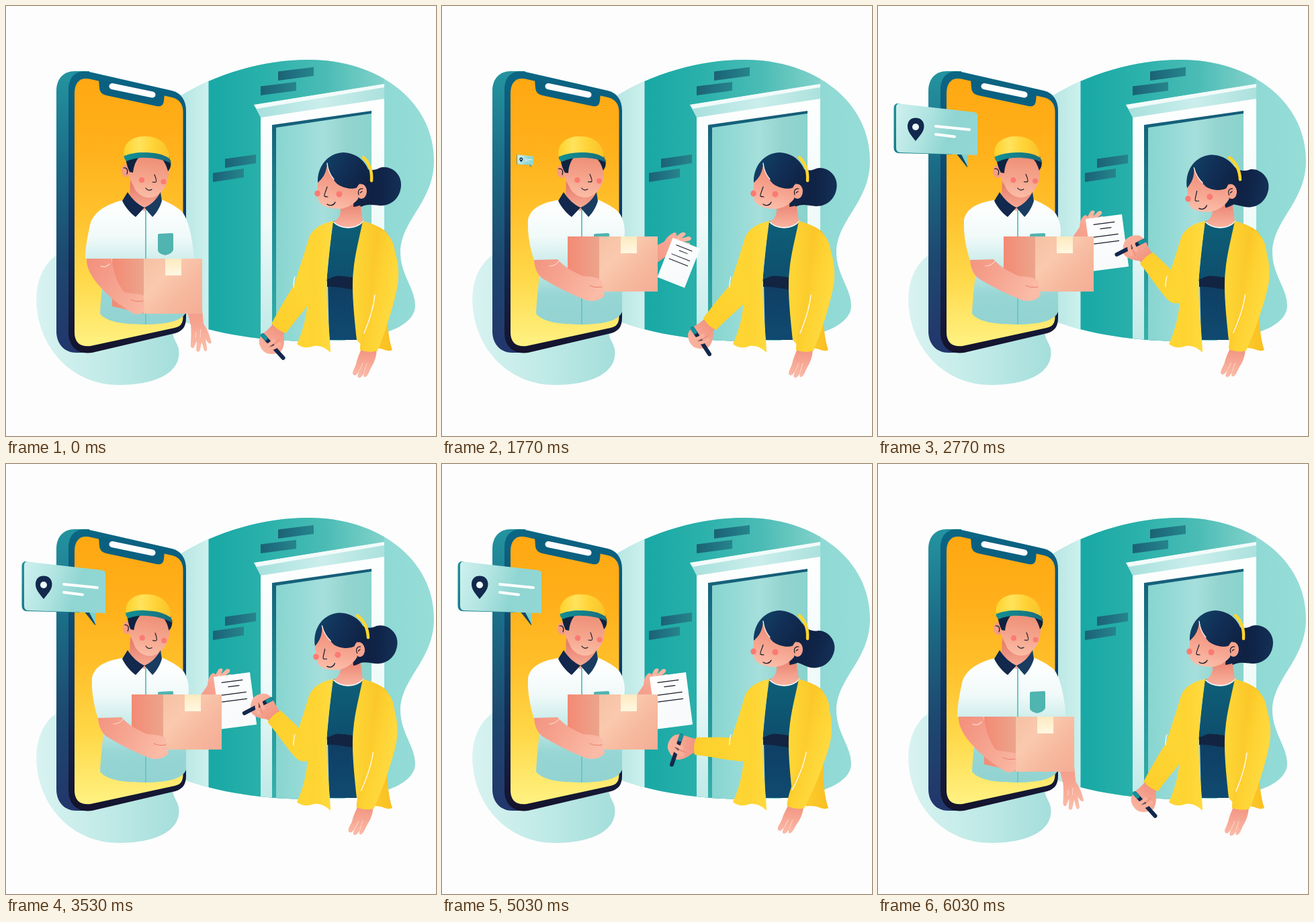
Animation, 640 px wide and 640 px high, one loop 6060 ms. Source, as an HTML page with a canvas:

```html
<!DOCTYPE html>
<html lang="en">
<head>
<meta charset="utf-8">
<title>Parcel delivery</title>
<style>
  html, body { margin: 0; width: 100%; height: 100%; overflow: hidden; background: #fdfdfd; }
  canvas { display: block; width: 640px; height: 640px; }
</style>
</head>
<body>
<canvas id="stage"></canvas>
<script>
const LOOP = 6060, RAD = Math.PI / 180;
const cv = document.getElementById('stage');
const c = cv.getContext('2d');
const dpr = window.devicePixelRatio || 1;
cv.width = cv.height = 640 * dpr;

const NAVY = '#12284c', INK = '#1a1a2a', BLUSH = '#fb7a72';

// ---- helpers ----
const ease = p => (1 - Math.cos(Math.PI * p)) / 2;

function key(t, ...k) {
  if (t <= k[0][0]) return k[0][1];
  for (let i = 1; i < k.length; i++) {
    const [a, va] = k[i - 1], [b, vb] = k[i];
    if (t < b) return va + (vb - va) * ease((t - a) / (b - a));
  }
  return k[k.length - 1][1];
}

// blends two path strings with the same commands
function mix([a, b], u) {
  const nums = b.match(/-?[\d.]+/g);
  let i = 0;
  return new Path2D(a.replace(/-?[\d.]+/g, n => {
    const m = nums[i++];
    return (+n + (m - n) * u).toFixed(2);
  }));
}

function grad(x0, y0, x1, y1, ...cols) {
  const g = c.createLinearGradient(x0, y0, x1, y1);
  cols.forEach((col, i) => g.addColorStop(i / (cols.length - 1), col));
  return g;
}

const cache = {};
const path = d => d instanceof Path2D ? d : cache[d] || (cache[d] = new Path2D(d));

function fill(d, style) {
  c.fillStyle = style;
  c.fill(path(d));
}

function line(d, style, w) {
  c.strokeStyle = style;
  c.lineWidth = w;
  c.stroke(path(d));
}

function oval(x, y, rx, ry, style) {
  c.fillStyle = style;
  c.beginPath();
  c.ellipse(x, y, rx, ry, 0, 0, 7);
  c.fill();
}

function turn(x, y, deg, draw) {
  c.save();
  c.translate(x, y);
  c.rotate(deg * RAD);
  c.translate(-x, -y);
  draw();
  c.restore();
}

// ---- scenery ----
const BLOB = 'M255,137 C312,100 385,80 450,80 C555,80 637,142 637,230 C637,292 588,318 587,366 ' +
  'C587,400 609,420 609,446 C609,480 545,498 480,498 C410,501 325,494 255,466 Z';

function scenery() {
  fill('M80,368 C54,382 42,415 46,450 C52,512 100,564 168,564 C222,564 262,546 257,511 C255,499 245,494 250,478 L100,400 Z',
    grad(46, 0, 258, 0, '#d8f3f1', '#c0eae7', '#a4dedb'));
  c.save();
  c.clip(path(BLOB));
  c.fillStyle = grad(560, 0, 640, 0, '#8fd9d4', '#97ddd8');
  c.fillRect(240, 70, 400, 440);
  c.fillStyle = grad(255, 0, 301, 0, '#b4e5e2', '#cdf0ed');
  c.fillRect(250, 70, 52, 440);
  c.fillStyle = grad(301, 0, 563, 0, '#18a8a5', '#2bb1ab', '#4bbcb5', '#82d2cb');
  c.fillRect(301.5, 70, 261.5, 440);

  // door
  fill('M379,164 L563,136 L563,500 L379,500 Z', grad(0, 150, 0, 498, '#fdfefe', '#effaf9', '#bfe9e7'));
  fill('M369,147 L563,116 L563,138 L379,166 Z', grad(379, 0, 563, 0, '#aae1de', '#cbeeec', '#ace1dd'));
  fill('M369,147 L563,116 L563,121 L373,153 Z', '#f2fbfa');
  fill('M396,177 L544,156 L544,500 L396,500 Z', grad(0, 160, 0, 490, '#155d78', '#1f8c94', '#34b0aa'));
  fill('M402,181 L544,160 L544,500 L402,500 Z', grad(402, 0, 544, 0, '#88d5d0', '#95dad6', '#a6dfdc', '#93d4cf', '#8ad3cd'));
  c.restore();

  const brick = (x, y, w) =>
    fill(`M${x},${y} l${w},-6.5 l0,13 l${-w},7 Z`, grad(x, 0, x + w, 0, '#1b6274', '#207383', '#26858a'));
  brick(405, 97.5, 53);
  brick(379, 119.5, 53);
  brick(326, 227.5, 46);
  brick(308, 248.5, 46);
}

function phone() {
  fill('M75,126 C75,108 86,97 102,97 L124,97 L124,516 L104,516 C88,516 75,504 75,484 Z',
    grad(0, 97, 0, 516, '#2494a0', '#1b6c86', '#1d486f', '#22366c'));
  fill('M93,124 C93,104 106,94 124,98 L247,126 C260,129 268,140 268,156 L268,464 C268,478 262,484 252,487 ' +
    'L128,516 C108,519 93,508 93,486 Z',
    grad(0, 97, 0, 516, '#0b6784', '#0d5278', '#123a64', '#13234a', '#15132c'));
  fill('M102,130 C102,113 111,106 124,108.500 L247,136 C258,139 263.500,146 263.500,158 L263.500,462 ' +
    'C263.500,472 260,477 251,479 L126,506 C111,508 102,501 102,486 Z',
    grad(0, 108, 0, 506, '#ffa812', '#ffb01a', '#ffc12c', '#ffd94a', '#fff282'));
  fill('M138,109 L139,122 C140,129 143,131 149,133 L224,149 C231,150 234,148 235,141 L236,130 Z', '#0b6080');
  line('M158,119.500 L218,132', '#fdfdfd', 9);
}

function bubble(s) {
  if (s <= 0.01) return;
  c.save();
  c.translate(133, 240);
  c.scale(s, s);
  c.translate(-133, -240);
  fill('M28,145 C25,146 23.500,148 23.500,152 L23.500,210 C23.500,215 25,218 30,219 L110,221 L60,150 Z',
    grad(0, 146, 0, 219, '#23919a', '#167c8c'));
  fill('M116,219 L133,240.500 L131,220 Z', '#124a68');
  fill('M123,219 L134,240 L133,219 Z', '#7fcfca');
  fill('M32,145.500 L143,158 Q148,159 148,163 L148,222 L33,218 Q27,217.500 27,211 L27,151 Q27,145 32,145.500 Z',
    grad(27, 160, 148, 200, '#ccefed', '#b2e5e2', '#8fd5d1', '#92d7d3'));
  fill('M56,201 C51,194 44,188 44,179 C44,171 49,166.500 56,166.500 C63,166.500 68.500,171 68.500,179 C68.500,188 61,194 56,201 Z', NAVY);
  oval(56, 180, 5, 5, '#f0fbfa');
  line('M86,179 L136,184', '#fff', 4);
  line('M86,191 L114,194.500', '#fff', 4);
  c.restore();
}

// ---- courier ----
function paper(s) {
  if (s <= 0.01) return;
  c.save();
  c.translate(88.8, -7);
  c.rotate(53.6 * RAD);
  c.scale(s, s);
  fill('M0,0 L54.500,0 L54.500,78.500 L0,78.500 Z', grad(0, 0, 54, 78, '#fefefe', '#f7f9fa'));
  line('M11,10 L42,10 M20,17.500 L36,17.500 M9,28.500 L45,28.500 M8,38.500 L45,38.500', INK, 1.3);
  c.restore();
}

// open hand, holding hand
const REACH = [
  'M0,-14 C30,-12 55,-11 78,-9 C88,-14 96,-15 107,-16 C110,-14 108,-11 100,-8 L116,-8 C120,-6 119,-3 115,-3 ' +
  'L104,-2 L116,3 C119,6 117,9 113,8 L101,5 L110,11 C112,14 109,16 105,15 C96,13 88,11 77,10 C50,12 25,14 0,13 Z',
  'M0,-14 C30,-12 55,-11 74,-9 C80,-12 86,-13 90,-12 C94,-11 95,-9 93,-6 L101,-6 C106,-5 107,-1 104,0 ' +
  'L98,1 L108,4 C112,7 110,11 106,10 L98,7 L104,12 C106,15 103,17 99,16 C92,14 84,12 77,10 C50,12 25,14 0,13 Z'];

function courierReach(raise, sheet) {
  c.save();
  c.translate(272, 398);
  c.rotate((80.3 - 141.3 * raise) * RAD);
  fill(mix(REACH, raise), grad(30, 0, 118, 0, '#f39482', '#f6a390', '#fbbfaa'));
  line('M86,-3 L96,-1 M88,4 L95,6', '#fdd9cc', 1);
  paper(sheet);
  c.restore();
}

const SHIRT = [
  'M178,288 C150,294 130,306 125,326 C121,345 118,360 118,376 L146,378 C145,405 141,435 140,458 C150,471 178,474 208,474 ' +
  'C240,474 264,468 268,455 L270,376 L280,376 C278,350 272,318 262,306 C252,297 240,292 230,287 L206,304 Z',
  'M178,288 C150,292 132,300 128,318 C127,340 131,360 137,379 L146,382 C145,405 141,435 140,458 C150,471 178,474 208,474 ' +
  'C240,474 264,468 268,455 L268,376 L271,345 C274,332 270,314 262,306 C252,297 240,292 230,287 L206,304 Z'];
const ARM = [
  'M120,376 C119,390 128,405 142,420 C158,438 175,448 188,457 C196,461 205,458 206,451 L205,431 C196,427 182,429 175,425 C165,412 160,395 157,376 Z',
  'M137,378 C138,392 143,402 152,407 C170,418 190,428 212,437 C222,441 237,439 242,430 L238,409 C230,402 218,403 210,402 C195,396 182,388 172,377 Z'];
const CREASE = ['M141,387 C145,389 150,388 154,384', 'M160,387 C165,387 170,385 174,380'];
const FINGER = ['M186,437 C192,440 198,440 204,439', 'M220,416 C226,419 232,419 238,418'];

function courierHead() {
  oval(179, 245, 7, 9.5, '#f59c84');
  fill('M183,228 C200,222 232,225 242,232 C244,258 239,274 223,283 C213,288 200,285 192,273 L183,254 Z',
    grad(215, 224, 208, 286, '#ee8f76', '#f5a48c', '#fbbda6'));
  line('M175,241 C180,240 182,244 180,250', INK, 1.2);
  oval(202, 259, 4.2, 4.2, BLUSH);
  oval(234.500, 261.500, 4, 4, BLUSH);
  line('M221,251 C223,256 225,261 223,262 C221,263 220,262 218,262', INK, 1.2);
  line('M208,271 C210,274.500 214,275 217,273', INK, 1.2);
  // sideburns
  fill('M178,226 L198,225 C193,231 190,238 189,248 L184,247 C181,241 179,234 178,226 Z', '#10223f');
  fill('M230,226 L245,230 C246,237 245,242 241,246 C239,238 236,231 230,226 Z', '#10223f');
  fill('M176,222 C190,212 226,210 243,224 L245,234 C234,228 215,225 200,226 C190,227 184,229 180,231 C177,229 175,226 176,222 Z',
    grad(176, 0, 243, 0, '#128f94', '#14808a', '#1c6c7c'));
  fill('M176,223 C173,206 186,194 206,194 C230,194 243,207 243,227 C233,220 222,218 204,218 C193,218 184,220 176,223 Z',
    grad(176, 0, 243, 0, '#ffd22c', '#ffe35c', '#ffd235', '#f8c22c'));
}

function courier(u, raise, sheet, tilt) {
  courierReach(raise, sheet);
  fill(mix(SHIRT, u), grad(0, 300, 0, 474, '#fdfefe', '#f0faf9', '#c6eae8', '#96d6d4', '#92d3d2'));
  line('M208,302 L208,473', '#6cc6c2', 2);
  fill('M226,341 Q226,339 228,339 L247,338 Q249,338 249,340 L249,363 Q248,368 237,371 Q227,369 226,364 Z', '#50b4b0');
  fill('M185,258 L184,281 C190,297 200,304 206,305 C215,301 226,292 229,281 L226,268 Z', grad(0, 268, 0, 304, '#e87f6e', '#f9b09c'));
  turn(207, 275, tilt, courierHead);
  fill('M173,290 L181,277 C188,288 197,296 206,300 L193,314 C185,308 178,300 173,290 Z', NAVY);
  fill('M230,277 L232,290 C229,300 224,308 218,314 L206,300 C216,296 224,288 230,277 Z', '#193c60');

  c.save();
  c.translate(29 * u, -33 * u);
  fill('M158,376 L205.500,376 L205.500,458 L158,447 Z', grad(158, 0, 205, 0, '#f38a74', '#f19780', '#eba58c'));
  fill('M205,376 L292,376 L292,458 L205,458 Z', grad(205, 376, 292, 458, '#f6c1a4', '#fac9ae', '#f6b89e', '#f5ad96'));
  fill('M237,376 L261,376 L261,401 L237,401 Z', grad(0, 376, 0, 401, '#fdeac0', '#fff8e2'));
  c.restore();

  fill(mix(ARM, u), grad(125, 380, 225, 435, '#f2917e', '#f6a591', '#fabba7'));
  line(mix(CREASE, u), '#fddccf', 1.2);
  line(mix(FINGER, u), '#ea7d6c', 1);
}

// ---- customer ----
function customerHead(sway) {
  turn(536, 258, sway, () =>
    fill('M530,238 C540,246 549,245 556,241 C570,236 589,248 588,267 C587,287 572,298 556,297 C545,296 538,294 528,299 C520,280 522,255 530,238 Z',
      grad(530, 0, 588, 0, '#0e2040', '#102448', '#143056')));
  fill('M520,235 C544,236 548,262 541,288 C535,294 526,298 517,299 Z', '#102346');
  fill('M470,240 C464,255 462,275 465,290 C470,299 484,302 496,302 C508,301 518,295 524,287 L530,250 L500,228 Z',
    grad(495, 245, 480, 302, '#f08f7a', '#f6a590', '#fcc0ac'));
  fill('M464,263 C463,238 480,218 503,218 C526,219 544,238 542,263 L535,268 C530,262 525,263 523,270 C516,274 500,271 492,264 ' +
    'C485,256 480,246 478,234 C477,248 472,256 464,263 Z', grad(464, 220, 540, 270, '#10466a', '#122f56', '#0f2040'));
  line('M478,234 C479,244 483,252 488,258', '#fdf4f0', 1.3);
  line('M532,225.500 C541,234 545,246 544,260', '#ffd62e', 4.5);
  oval(529, 276, 8, 11, '#f7a48e');
  line('M525,281 C523,275 526,271 531,272 M527,278 L530,276', INK, 1.2);
  oval(463.500, 279, 4.2, 4.5, BLUSH);
  oval(496, 280, 4.5, 4.5, BLUSH);
  line('M478,269 C476,276 473,281 474,283 C475,284 477,284 479,284', INK, 1.2);
  line('M478,295 C482,298 488,297 490,292', INK, 1.3);
}

function penArm(angle) {
  c.save();
  c.translate(443, 425);
  c.rotate(angle * RAD);
  fill('M60,-10 L70,-11 C76,-17 84,-22 92,-22 C99,-20 105,-12 107,-6 C108,2 104,10 98,14 C92,17 84,15 78,13 L68,11 L60,11 Z',
    grad(62, 0, 106, 0, '#f0917e', '#fab4a0'));
  line('M88,14 L99,-30', NAVY, 6);
  line('M88,14 L89.500,8', '#16909a', 6);
  line('M85,-14 C92,-12 97,-8 101,-4 M86,-4 C92,-3 96,-1 99,2', '#f9b09b', 5.5);
  line('M80,-10 C86,-8 91,-8 97,-4', '#e67c6a', 0.8);
  fill('M2,-17 C24,-17 46,-13 66,-13 Q70,0 66,13 C44,15 24,17 2,17 A17,17 0 0 1 2,-17 Z',
    grad(-10, 0, 68, 0, '#fed634', '#fdcf2c'));
  c.restore();
}

function freeArm() {
  fill('M531,506 L552,507 C552,524 547,532 543,539 C540,546 538,551 535,552 C532,553 532,550 533,546 C530,551 528,554 525,553 ' +
    'C522,552 524,548 526,543 C522,549 520,551 517,549 C514,546 519,539 521,533 C523,524 526,517 531,506 Z',
    grad(0, 508, 0, 553, '#f2927f', '#fbbba8'));
  line('M533,545 L537,532 M526,543 L531,532', '#fdd6ca', 1);
  fill('M553,332 C570,336 577,350 579,366 C585,385 586,405 581,425 C574,456 564,486 553,513 C544,516 536,515 527,512 ' +
    'C527,490 538,460 546,430 C548,400 545,370 553,332 Z', grad(535, 400, 583, 410, '#fbc426', '#fed232', '#ffda40'));
  line('M549,430 C547,450 540,470 533,487', '#fffaf0', 1.4);
}

function customer(tilt, sway, angle, swing) {
  // top, belt and skirt
  fill('M486,320 L533,320 L523,410 L477,410 Z', grad(0, 320, 0, 405, '#0d5f78', '#0e4f6e'));
  fill('M479,412 L518,412 L523,497 L481,497 Z', grad(0, 415, 0, 497, '#0f3e64', '#104a70'));
  fill('M478,407 C486,404 492,400 499,402 C506,402 512,404 519,404 L519,422 C505,421 490,417 478,418 Z', '#122442');
  fill('M497,288 L526,284 L531,320 C522,332 500,334 488,321 Q497,316 498,306 Z', grad(0, 292, 0, 328, '#ea8270', '#f9b29e'));
  line('M487,321 C498,333 521,333 532,320', '#fdfdfd', 1.6);

  fill('M487,320 C468,324 456,332 451,345 C443,372 434,398 428,418 C424,436 436,445 449,442 C446,470 440,488 433,503 ' +
    'C441,510 450,509 458,506 C468,505 476,509 483,516 C483,490 475,440 478,400 C480,370 484,345 487,320 Z',
    grad(432, 0, 487, 0, '#fed634', '#fed432', '#ffdb40'));
  fill('M531,320 C545,324 560,329 567,338 L572,400 C566,440 565,480 575,512 C567,516 560,508 548,509 C536,510 528,505 522,497 ' +
    'C518,460 514,420 517,395 C519,370 526,345 531,320 Z', grad(515, 0, 572, 0, '#fed838', '#fccb2c', '#fac022'));
  turn(556, 345, swing, freeArm);
  penArm(angle);
  line('M430,403 C428,409 428,413 428,418', '#fffaf0', 1.3);
  turn(528, 300, tilt, () => customerHead(sway));
}

// ---- timeline ----
function draw(t) {
  c.setTransform(dpr, 0, 0, dpr, 0, 0);
  c.lineCap = c.lineJoin = 'round';
  c.fillStyle = '#fdfdfd';
  c.fillRect(0, 0, 640, 640);

  const lift = key(t, [0, 0], [1020, 1], [5060, 1], [LOOP, 0]);
  const raise = key(t, [1000, 0], [2100, 1], [5060, 1], [LOOP, 0]);
  const sheet = key(t, [1100, 0], [2050, 1], [5060, 1], [5800, 0]);
  const nod = key(t, [1000, 0], [1700, -2.3], [3000, -2.3], [4000, 7], [4400, 7], [5030, 0]);
  const pop = key(t, [1660, 0], [2060, 1.11], [2300, 0.97], [2550, 1], [5080, 1], [5220, 1.05], [5600, 0]);
  const tilt = key(t, [1900, 0], [2700, -7], [4400, -7], [5030, 0]);
  const sway = 18 * ease(6 * t / LOOP);
  const swing = key(t, [2000, 0], [2770, 1.7], [4330, 2], [5050, 4.7], [LOOP, 0]);
  let pen = key(t, [1560, 124], [2700, 229], [4520, 229], [5650, 124]);
  if (t > 2770 && t < 4330) pen += 2 * Math.sin((t - 2770) / 1560 * Math.PI * 8);

  scenery();
  phone();
  courier(lift, raise, sheet, nod);
  bubble(pop);
  customer(tilt, sway, pen, swing);
}

const start = performance.now();
function tick(now) {
  draw(Math.max(0, now - start) % LOOP);
  requestAnimationFrame(tick);
}
draw(0);
requestAnimationFrame(tick);
</script>
</body>
</html>
```
